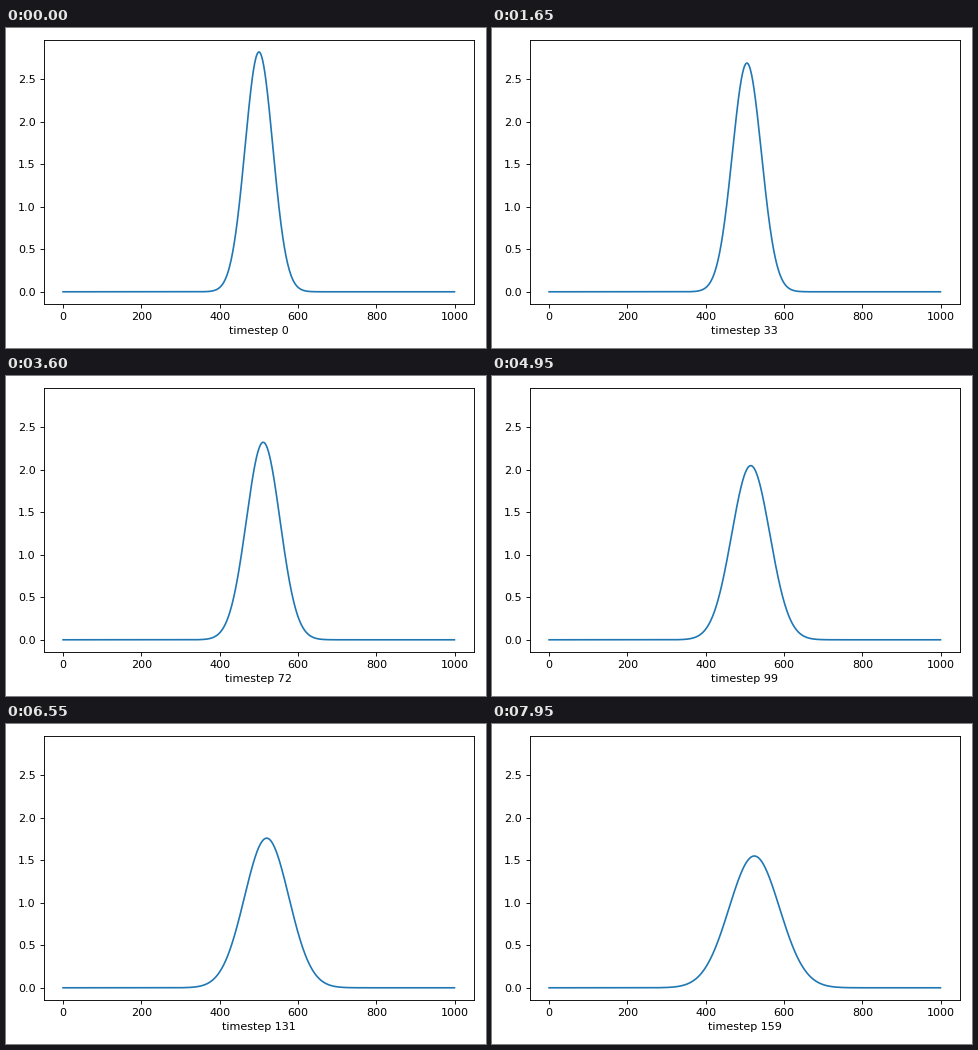
These frames come from a looping animation (480x320 px, 8000 ms). A matplotlib script:

```python
import numpy as np
import matplotlib.pyplot as plt
from matplotlib.animation import FuncAnimation

POINTS = 1000
LENGTH = 4.0
WIDTH = 0.2                  # initial packet width
K0 = 2 * np.pi / LENGTH      # mean wave number
DT = WIDTH**2 / 104.6
STEPS = 160

x = (np.arange(POINTS) - POINTS / 2) * LENGTH / POINTS


def density(step):
    """Probability density of a free, spreading Gaussian wave packet."""
    t = step * DT
    width = WIDTH * np.sqrt(1 + (t / WIDTH**2) ** 2)
    return np.exp(-((x - K0 * t) / width) ** 2) / (width * np.sqrt(np.pi))


fig, ax = plt.subplots(figsize=(6, 4), dpi=80)
line, = ax.plot(density(0))
label = ax.set_xlabel("timestep 0")
fig.tight_layout()
ax.set_xlim(ax.get_xlim())
ax.set_ylim(ax.get_ylim())


def update(step):
    line.set_ydata(density(step))
    label.set_text(f"timestep {step}")
    return line, label


anim = FuncAnimation(fig, update, frames=STEPS, interval=50,
                     repeat=True, repeat_delay=0, blit=False)
plt.show()
```
